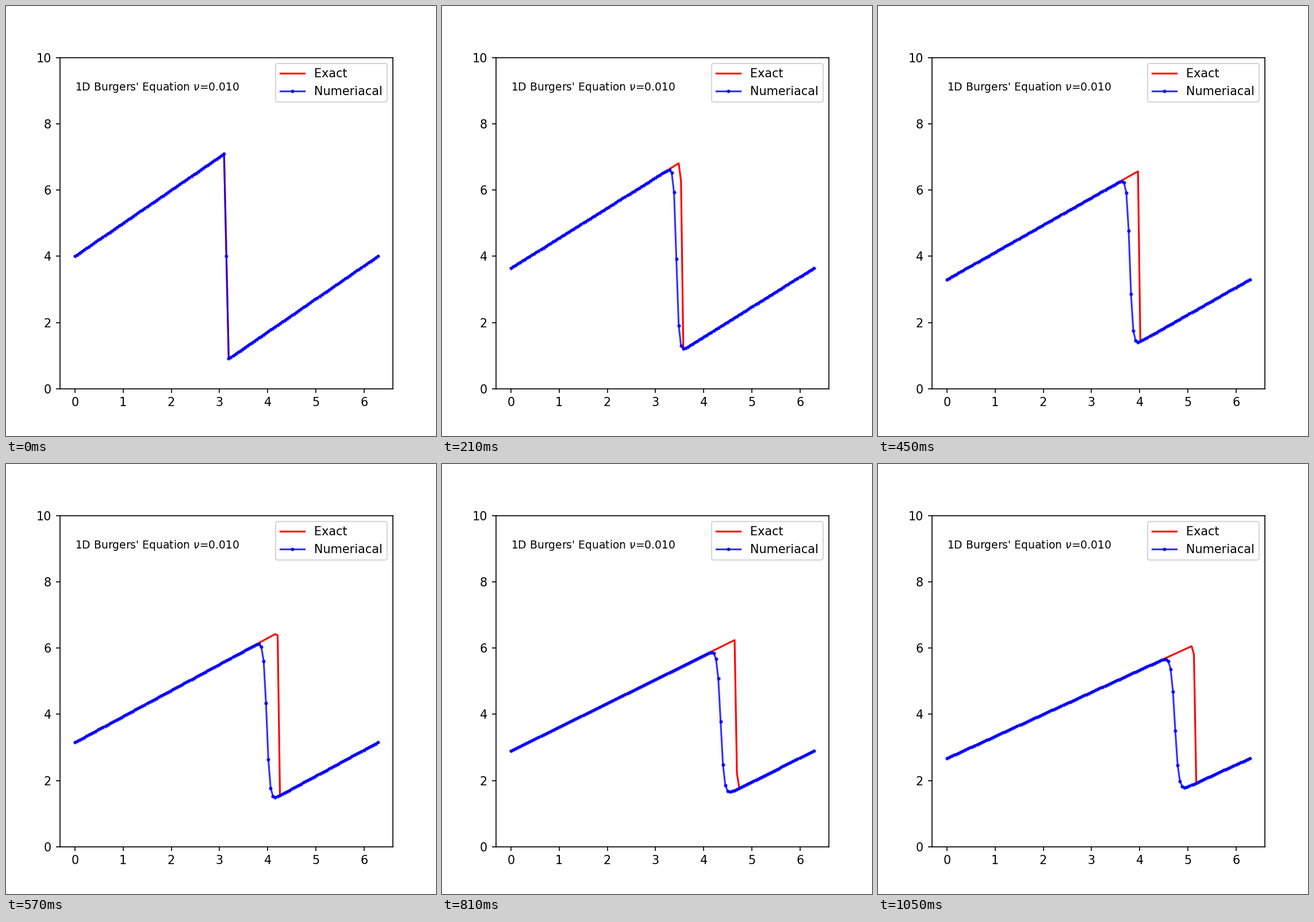
A matplotlib script that plays this animation: 748 px wide and 748 px high, repeating every 1.08 s.

```python
import numpy as np
import matplotlib.pyplot as plt
from matplotlib.animation import FuncAnimation

SIZE, DPI = 748, 149.6
NU = 0.01
NX = 131
NT = 350
T_END = 0.5
STRIDE = 10
FRAMES = NT // STRIDE + 1

x = np.linspace(0, 2 * np.pi, NX)
dx = x[1] - x[0]
dt = T_END / NT


def exact(t):
    """Travelling sawtooth: two ramps blended across the viscous shock."""
    s = x - 4 * t
    width = 4 * NU * (1 + t)
    k = 4 * np.pi * (s - np.pi) / width
    passed = 1 / (1 + np.exp(-np.clip(k, -500, 500)))
    return 4 + (s - 2 * np.pi * passed) / (1 + t)


def step(u):
    """Non-conservative upwind advection, central diffusion, periodic ends."""
    v = u[:-1]
    left, right = np.roll(v, 1), np.roll(v, -1)
    new = (v - v * dt / dx * (v - left)
           + NU * dt / dx**2 * (right - 2 * v + left))
    return np.append(new, new[0])


def solve():
    states = [exact(0)]
    for _ in range(NT - 1):
        states.append(step(states[-1]))
    return states


states = solve()

fig, ax = plt.subplots(figsize=(SIZE / DPI, SIZE / DPI), dpi=DPI)
exact_line, = ax.plot(x, states[0], "r-", lw=1.5, label="Exact")
num_line, = ax.plot(x, states[0], "bo-", lw=1.5, ms=2, alpha=0.8,
                    label="Numeriacal")
ax.set_xlim(-0.1 * np.pi, 2.1 * np.pi)
ax.set_ylim(0, 10)
ax.text(0, 9, rf"1D Burgers' Equation $\nu$={NU:.3f}", fontsize=9)
ax.legend(loc="upper right")


def update(i):
    n = max(0, i * STRIDE - 1)
    exact_line.set_ydata(exact(n * dt))
    num_line.set_ydata(states[n])
    return exact_line, num_line


anim = FuncAnimation(fig, update, frames=FRAMES, interval=30, repeat=True,
                     repeat_delay=0)
plt.show()
```
